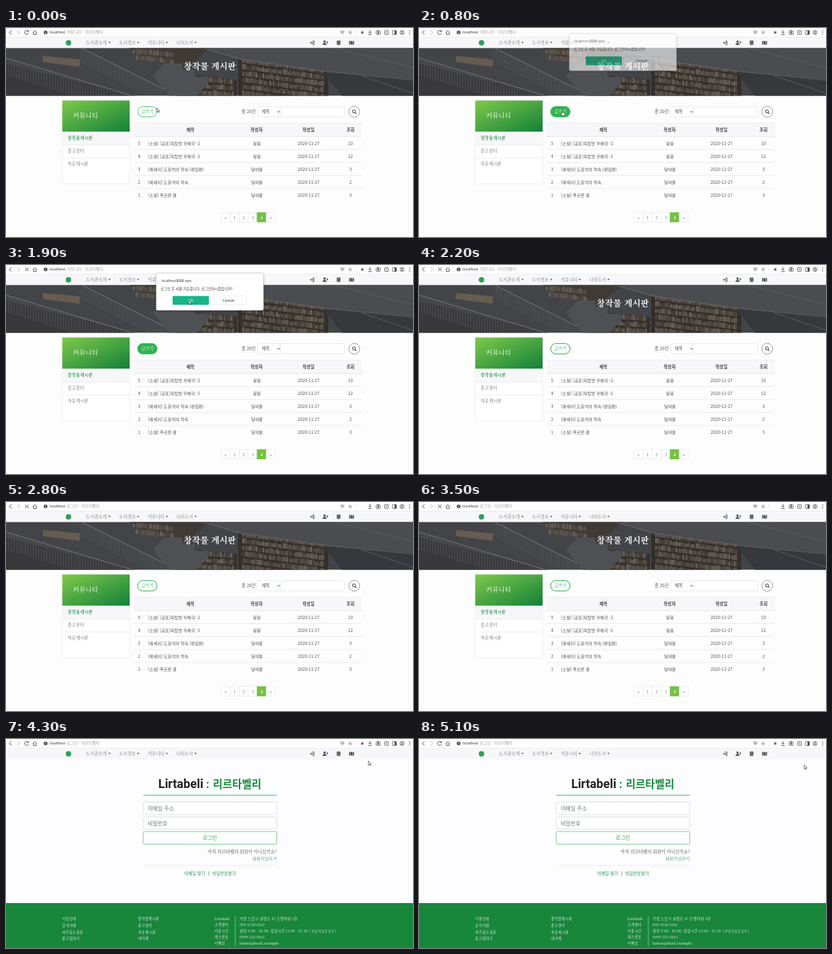
These frames come from a looping animation (596x307 px, 5200 ms). An HTML page:

```html
<!DOCTYPE html>
<html lang="ko">
<head>
<meta charset="utf-8">
<style>
html, body { margin: 0; width: 100%; height: 100%; overflow: hidden; background: #fdfdfe; }
svg { display: block; width: 596px; height: 307px; }
text { font-family: "Noto Sans CJK KR", "Noto Sans", sans-serif; white-space: pre; }
.serif { font-family: "Noto Serif CJK KR", "Noto Serif", "Noto Sans CJK KR", serif; }
.head { font-family: Roboto, "Noto Sans CJK KR", sans-serif; font-weight: 700; }
.ui { font-family: "Noto Sans", "Noto Sans CJK KR", sans-serif; }
</style>
</head>
<body>
<svg id="stage" viewBox="0 0 596 307" xmlns="http://www.w3.org/2000/svg"></svg>
<script>
const LOOP = 5200, STEP = 100;
const BRAND = '리르타벨리', LATIN = 'Lirtabeli';
const GREEN = '#2fb350', LINK = '#279653', RULE = '#e4e6ea';

const text = (x, y, s, size, fill = '#505050', cls = '', extra = '') =>
  `<text x="${x}" y="${y}" font-size="${size}" fill="${fill}" class="${cls}" ${extra}>${s}</text>`;
const mid = (x, y, s, size, fill, cls, extra = '') =>
  text(x, y, s, size, fill, cls, 'text-anchor="middle" ' + extra);
const rect = (x, y, w, h, fill, extra = '') =>
  `<rect x="${x}" y="${y}" width="${w}" height="${h}" fill="${fill}" ${extra}/>`;
const box = (x, y, w, h, stroke, r = 0, fill = '#fff', sw = .7, extra = '') =>
  rect(x, y, w, h, fill, `rx="${r}" stroke="${stroke}" stroke-width="${sw}" ${extra}`);
const path = (d, stroke, sw = 1, fill = 'none', extra = '') =>
  `<path d="${d}" stroke="${stroke}" stroke-width="${sw}" fill="${fill}" ${extra}/>`;
const shape = (d, fill) => `<path d="${d}" fill="${fill}"/>`;
const dot = (x, y, r, fill, extra = '') => `<circle cx="${x}" cy="${y}" r="${r}" fill="${fill}" ${extra}/>`;
const group = (id, body, extra = '') => `<g id="${id}" ${extra}>${body}</g>`;

function toolbar() {
  const c = '#4a4a4a';
  return rect(0, 0, 596, 13, '#fdfdfd') +
    path('M8 3.5L5 6.5L8 9.5', c) + path('M17 3.5L20 6.5L17 9.5', '#b5b5b5') +
    group('reload', path('M32.3 4.5A2.9 2.9 0 1 0 33 7.3M33 3v2.2h-2.4', c, .9)) +
    group('stop', path('M28 4L33 9M33 4L28 9', c, .9)) +
    path('M39.3 6.6L42.2 3.8L45.1 6.6M40.2 6v3.6h4V6', c, .9) +
    dot(58, 6.4, 2.7, '#444') + rect(57.6, 6, .9, 2.1, '#fff') + rect(57.6, 4.5, .9, .9, '#fff') +
    text(64, 8.4, 'localhost', 5.4, '#333', 'ui') +
    text(89, 8.4, '', 5.8, '#a2a2a2', '', 'id="tab"') +
    shape('M492.5 9.5L489.5 6.5Q489 3.7 491 3.7H494Q496 3.7 495.5 6.5Z', '#bbb') +
    shape('M504 3l1 2.2 2.5.2-1.9 1.6.6 2.5-2.2-1.3-2.2 1.3.6-2.5-1.9-1.6 2.5-.2z', '#bbb') +
    rect(512.5, 3, .6, 7, '#ddd') +
    group('flag', rect(518.5, 4, 6, 5, '#efefef') + shape('M520 6.5a1.7 1.7 0 0 1 3.4 0z', '#c8313f') +
      shape('M520 6.5a1.7 1.7 0 0 0 3.4 0z', '#2c4378')) +
    path('M533 3v4.5M531 5.7l2 2 2-2M530.5 9.7h5', c, .9) +
    box(542, 4.5, 6, 4.8, c, .8, 'none', .8) + dot(545, 6.9, 1.3, c) + rect(544, 3.3, 2, 1, c) +
    box(554.5, 3.8, 5.4, 5.6, c, .8, 'none', .8) + path('M557.2 5v3', c, .8) +
    box(566, 3.8, 5.8, 5.6, c, .5, 'none', .8) + rect(569, 4, 2.6, 5.2, c) +
    dot(580, 6.5, 2.9, 'none', `stroke="${c}" stroke-width=".8"`) + dot(580, 5.7, 1, c) +
    path('M578.2 8.5q1.8-1.8 3.6 0', c, .8) +
    [4, 6.5, 9].map(y => dot(591, y, .7, c)).join('');
}

function nav() {
  const c = '#4b4f54';
  const items = [[117, '도서관소개', 151.5], [165.5, '도서정보', 193.5], [207.5, '커뮤니티', 235.5], [249.5, '나의도서', 277.5]];
  return rect(0, 13, 596, 17, '#f7f7f9') + rect(0, 13, 596, .6, '#e8e8ea') + dot(91.5, 21.8, 4, '#2f9f5c') +
    items.map(([x, s, cx]) => text(x, 23.8, s, 6.3, '#777', 'serif') +
      shape(`M${cx - 1.8} 20.6h3.6l-1.8 2z`, '#555')).join('') +
    path('M445 21.7h4M447.3 19.8l2 1.9-2 1.9M449 19h2v5.4h-2', c) +
    dot(466.5, 20, 1.7, c) + shape('M463.5 24.7q0-2.8 3-2.8t3 2.8z', c) + path('M469 21h3M470.5 19.5v3', c, .9) +
    rect(484.5, 18.5, 5.2, 6.4, c, 'rx=".8"') + path('M486 20.5h2.6M485.5 23.6h4', '#eee', .6) +
    shape('M502.5 19.5l2-.8v5.2l-2 .8zM505 18.7l2 .8v5.2l-2-.8zM507.5 19.5l2-.8v5.2l-2 .8z', c);
}

// shelves of small uneven spines
function books(x, y, w, rows, slope) {
  let out = '', seed = 7;
  const rnd = () => (seed = seed * 16807 % 2147483647) / 2147483647;
  for (let r = 0; r < rows; r++)
    for (let i = 0; i < w; i += 2.5) {
      const h = 5 + rnd() * 3, v = 72 + rnd() * 45 | 0;
      out += rect(x + i, y + r * 9.5 + i * slope + 8 - h, 1.9, h, `rgb(${v},${v - 8},${v - 17})`);
    }
  return out;
}

function rail(x0, x1, y, slope, h) {
  const at = x => y + (x - x0) * slope;
  let d = '';
  for (let x = x0; x < x1; x += 4) d += `M${x} ${at(x)}v${h}`;
  return path(d, '#5d5e62', .7) + path(`M${x0} ${at(x0)}L${x1} ${at(x1)}`, '#737478', 1);
}

function hero() {
  return group('hero', rect(0, 29, 596, 71, '#434447') +
    shape('M0 52L190 100H0Z', '#39393c') +
    shape('M54 41L108 46V57L54 50Z', '#665c52') +
    rail(0, 190, 44, .3, 26) + rail(110, 260, 29, .5, 22) +
    shape('M180 29H300L262 58L215 48Z', '#3f3a36') + books(186, 29, 60, 2, .1) +
    shape('M258 68L338 76V100H250Z', '#332f2c') + books(264, 69, 70, 4, .08) +
    shape('M340 42L472 60V100H340Z', '#352f2b') + books(346, 43, 118, 6, .13) +
    shape('M215 70L232 52H258V62H276V72H296V82L278 100H240Z', '#4f5053') +
    shape('M290 29H596V76L470 64L340 46Z', '#4b4c50') + path('M290 30L345 46L470 64L596 77', '#707175', .8) +
    shape('M464 64L596 77V100H492Z', '#37383b') + path('M478 29L596 58M520 70L596 96', '#5c5d61'),
    'clip-path="url(#heroClip)"') +
    mid(298.5, 60.8, '창작물 게시판', 12.5, '#fff', 'serif', 'font-weight="600"');
}

function board() {
  const rows = [
    [5, '[소설] [공포]옥탑방 우체국 -2', '몽몽', 10],
    [4, '[소설] [공포]옥탑방 우체국 -1', '몽몽', 12],
    [3, '[에세이] 도윤석의 약속 (편집편)', '달여울', 3],
    [2, '[에세이] 도윤석의 약속', '달여울', 2],
    [1, '[소설] 푸르른 결', '달여울', 3]];
  const side = box(82, 106, 99, 123, RULE) + rect(82.4, 106.5, 98.6, 46, 'url(#leaf)') +
    text(98, 131.5, '커뮤니티', 9.5, '#fff', 'serif', 'font-weight="500"') +
    rect(82.4, 152.5, 98.2, 19.5, '#f7f7fa') + path('M82 172H181M82 191H181', RULE, .7) +
    text(90, 164.3, '창작물게시판', 6.3, LINK, 'serif', 'font-weight="600"') +
    text(90, 183.3, '중고장터', 6.3, '#666', 'serif') + text(90, 202.3, '자유게시판', 6.3, '#666', 'serif');
  const search = text(345, 125.3, '총 20건', 6.3) + box(368.5, 115.5, 33, 15, '#dfe2e6', 2) +
    text(374.5, 125.3, '제목', 6.3) + path('M397.5 122.2l1.6 1.7 1.6-1.7', '#333', .9) +
    box(401.5, 115.5, 94, 15, '#dfe2e6', 2) + dot(510, 123, 8, '#fff', 'stroke="#888" stroke-width=".8"') +
    dot(509.5, 122.5, 2.2, 'none', 'stroke="#333" stroke-width="1"') + path('M511.2 124.2l1.9 1.9', '#333', 1.1);
  const head = rect(187, 140, 334, 19.5, '#f7f7f9') + path('M187 140H521M187 159.5H521', RULE, .8) +
    [[270, '제목'], [367, '작성자'], [443, '작성일'], [504.5, '조회']]
      .map(([x, s]) => mid(x, 152.2, s, 6.3, '#444', '', 'font-weight="700"')).join('');
  const list = rows.map(([n, title, who, hits], i) => {
    const y = 171.5 + i * 19.1;
    return mid(195, y, n, 6.2) + text(208, y, title, 6.2) + mid(367.5, y, who, 6.2) +
      mid(443, y, '2020-11-27', 6.2) + mid(504.5, y, hits, 6.2) +
      (i < 4 ? path(`M187 ${y + 7}H521`, RULE, .7) : '');
  }).join('');
  const pages = ['«', 1, 2, 3, 4, '»'].map((s, i) => {
    const x = 315 + i * 13.2, on = s === 4;
    return box(x, 271, 13.2, 14, on ? '#74c043' : '#e2e5e9', 0, on ? '#74c043' : '#fff') +
      mid(x + 6.6, 280.5, s, 6.3, on ? '#fff' : '#666', 'serif', on ? 'font-weight="700"' : '');
  }).join('');
  const button = rect(191.9, 114.4, 30.2, 17.2, '#a4dfb2', 'rx="8.6" id="ring"') +
    box(193, 115.5, 28, 15, GREEN, 7.5, '#fff', .8, 'id="pill"') +
    mid(207, 125.4, '글쓰기', 6.3, GREEN, 'serif', 'id="write"');
  return group('board', hero() + side + button + search + head + list + pages);
}

function footer() {
  const t = (x, y, s, size = 5.4) => text(x, y, s, size, '#fff', 'serif', 'font-weight="500"');
  const column = (x, gap, items) => items.map((s, i) => t(x, 266.3 + i * gap, s)).join('');
  return rect(0, 241, 596, 66, '#18863b') +
    column(82, 9.6, ['이용안내', '공지사항', '자주묻는질문', '묻고답하기']) +
    column(193, 9.6, ['창작물게시판', '중고장터', '자유게시판', '내서재']) +
    column(305, 8.8, [LATIN, '고객센터', '이용시간', '팩스번호', '이메일']) +
    rect(335.5, 260, .7, 44, '#9ccbab') +
    column(342, 8.8, ['가람 노들구 솔빛로 47 은빛타워 5층', '099-5550-0142',
      '평일 9:00 - 18:00, 점심시간 12:00 - 13:30 <tspan font-size="4.4"> ( 주말/공휴일 휴무 )</tspan>',
      '0999-555-0163', 'lumen@mail.example']);
}

function login() {
  const mixed = [...BRAND].map((c, i) =>
    `<tspan font-weight="${i === 0 || i === 2 ? 300 : 700}">${c}</tspan>`).join('');
  const title = (id, x, kx, colon, name) => group(id, text(x, 72, LATIN, 17.8, '#222', 'head') +
    text(kx - 10, 72, ':', 16, colon, 'head') + text(kx, 71.5, name, 15.4, '#15893c', 'head'));
  return group('login', rect(0, 30, 596, 277, '#fdfcfe') +
    title('titleEarly', 221, 302, '#8a9a90', mixed) + title('titleDone', 223, 303, '#15893c', BRAND) +
    path('M201 82.5H396.5', '#45b35c', .9) +
    box(201, 92.5, 195.5, 18.5, '#ced4da', 2) + text(207.5, 104.7, '이메일 주소', 7.9, '#6c757d') +
    box(201, 114.5, 195.5, 18, '#ced4da', 2) + text(207.5, 126.5, '비밀번호', 7.9, '#6c757d') +
    box(201, 136, 195.5, 18.5, '#4cb964', 1.5) + mid(298.5, 148.2, '로그인', 7.7, '#35ad51') +
    text(396.5, 168.3, `아직 ${BRAND} 회원이 아니신가요?`, 6.4, '#444', 'serif', 'text-anchor="end"') +
    text(396.5, 177.5, '회원가입하기', 6.2, LINK, 'serif', 'text-anchor="end"') +
    path('M201 185.8H396.5', '#e2e2e5', .7) +
    text(261, 199.8, '이메일 찾기', 6.25, LINK) + rect(296.6, 194.3, .7, 6.4, '#777') +
    text(302, 199.8, '비밀번호찾기', 6.25, LINK) + footer());
}

function dialog() {
  return group('dialog', rect(220, 12, 157, 54.5, '#fff', 'rx="2" stroke="#bbb" stroke-width=".6" filter="url(#soft)"') +
    text(228, 25.3, 'localhost:8088 says', 4.8, '#333', 'ui') +
    text(226.5, 36.8, '로그인 후 사용 가능합니다. 로그인하시겠습니까?', 5.2, '#333') +
    rect(244, 45.5, 53, 13, '#18b68a', 'rx="1"') + mid(270.5, 54, 'OK', 5.6, '#fff', 'ui') +
    box(299.5, 45.5, 52.5, 13, '#e6e6e6', 1) + mid(325.7, 54, 'Cancel', 5.6, '#333', 'ui'));
}

const pointers =
  group('arrow', path('M0 0V6L1.4 4.8L2.4 6.8L3.3 6.4L2.4 4.4H4.2Z', '#222', .6, '#fff')) +
  group('hand', path('M-.6 0Q.2-.8 .9 0V2.3L3.5 3Q4 3.4 3.6 5L3 7H-.2L-2.3 4Q-1.9 2.8-.6 3.7Z', '#222', .6, '#fff')) +
  group('beam', path('M-1.3-2.5H1.3M0-2.5V2.5M-1.3 2.5H1.3', '#333', .8));

document.getElementById('stage').innerHTML = `<defs>
  <linearGradient id="leaf" x1="0" y1="0" x2="1" y2="1"><stop stop-color="#7fc94a"/><stop offset="1" stop-color="#128039"/></linearGradient>
  <clipPath id="heroClip"><rect y="29.5" width="596" height="70"/></clipPath>
  <filter id="soft" x="-5%" y="-10%" width="110%" height="125%"><feDropShadow dx="0" dy="1" stdDeviation="1.5" flood-opacity=".3"/></filter>
</defs>` + rect(0, 0, 596, 307, '#fdfdfe') + nav() + board() + login() + toolbar() + dialog() + pointers;

const el = id => document.getElementById(id);
const show = (id, on) => { el(id).style.display = on ? '' : 'none'; };

// time, x, y, pointer kind
const track = [
  [0, 221, 117.5, 'arrow'], [100, 219, 119, 'hand'], [400, 210, 122, 'hand'], [1000, 210, 122, 'arrow'],
  [1300, 262, 44, 'arrow'], [1600, 268, 51, 'arrow'], [2000, 268, 52, ''], [3600, 267, 54, 'beam'],
  [3800, 267, 54, 'arrow'], [4200, 515, 30, 'arrow'], [4500, 562, 37, 'arrow'], [4900, 564, 38, 'arrow'], [LOOP, 564, 38, 'arrow']];
const fade = [[700, 0], [800, .62], [900, .9], [1000, 1], [1900, 1], [2000, 0]];

function span(table, t) {
  let i = 0;
  while (i < table.length - 2 && t >= table[i + 1][0]) i++;
  const a = table[i], b = table[i + 1];
  const k = Math.min(1, Math.max(0, (t - a[0]) / (b[0] - a[0])));
  return { kind: a[3], at: n => a[n] + (b[n] - a[n]) * k };
}

function draw(t) {
  const onLogin = t >= 3600, fontsReady = t >= 3800, loading = t >= 1900 && t < 3800;
  show('board', !onLogin);
  show('login', onLogin);
  show('titleEarly', !fontsReady);
  show('titleDone', fontsReady);
  show('reload', !loading);
  show('stop', loading);
  show('flag', t < 2400 || onLogin);
  el('tab').textContent = (t < 2400 ? '커뮤니티' : '로그인') + ' - ' + BRAND;

  const hover = t >= 200 && t < 2000;
  el('pill').setAttribute('fill', hover ? GREEN : '#fff');
  el('write').setAttribute('fill', hover ? '#fff' : GREEN);
  show('ring', t >= 700);

  const alpha = span(fade, t).at(1);
  el('dialog').setAttribute('opacity', alpha);
  el('dialog').setAttribute('transform', `translate(0 ${t < 1000 ? -10 * (1 - alpha) : 0})`);

  const { kind, at } = span(track, t);
  for (const id of ['arrow', 'hand', 'beam']) {
    show(id, kind === id);
    el(id).setAttribute('transform', `translate(${at(1)} ${at(2)})`);
  }
}

const start = performance.now();
function tick() {
  const t = (performance.now() - start) % LOOP;
  draw(Math.floor(t / STEP) * STEP);
  requestAnimationFrame(tick);
}
tick();
</script>
</body>
</html>
```
